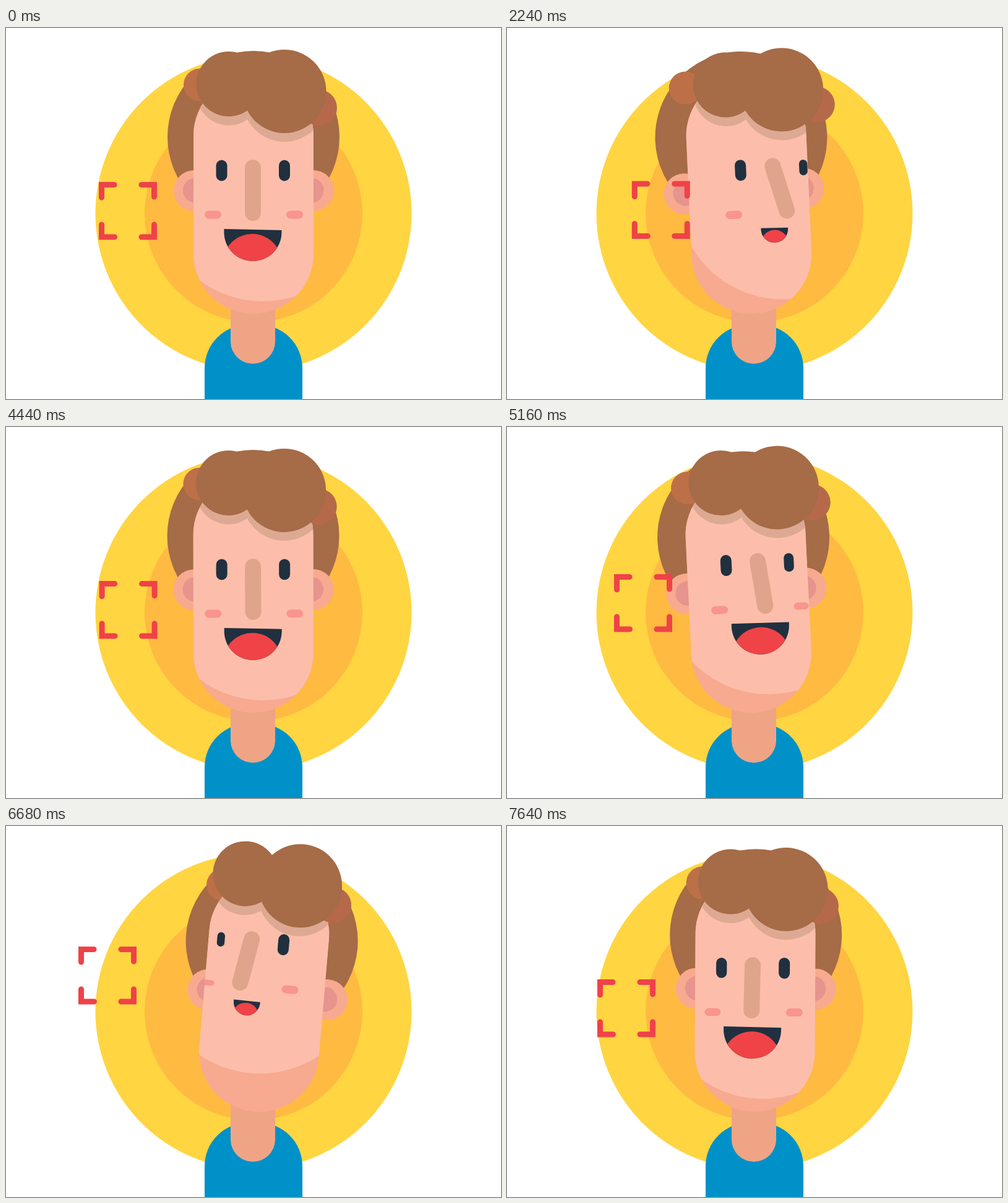
Recreate the animation shown at these times as an HTML page. Size 800 px wide and 600 px high, loop 7680 ms.

```html
<!DOCTYPE html>
<html lang="en">
<head>
<meta charset="utf-8">
<title>Talking head</title>
<style>
html, body { margin: 0; width: 100%; height: 100%; overflow: hidden; background: #fff; }
svg { display: block; width: 100%; height: 100%; }
</style>
</head>
<body>
<svg viewBox="0 0 800 600">
  <defs>
    <clipPath id="face"><rect x="303" y="77" width="194" height="385" rx="97"/></clipPath>
    <clipPath id="lips"><path id="lip" d="M-46.5 0H46.5V4.5A46.5 46.5 0 0 1-46.5 4.5Z"/></clipPath>
  </defs>
  <circle cx="400" cy="300" r="255.5" fill="#ffd541"/>
  <circle cx="400" cy="300" r="176" fill="#ffba42"/>
  <path d="M321 600V550A70 70 0 0 1 391 480H409A70 70 0 0 1 479 550V600Z" fill="#0091c9"/>
  <path d="M363 400H435V507A36 36 0 0 1 363 507Z" fill="#efa486"/>

  <g id="head">
    <g data-k="-.16">
      <circle cx="400" cy="176" r="139" fill="#a66b47"/>
      <g fill="#f7aa8f"><circle cx="304" cy="263" r="33"/><circle cx="497" cy="263" r="33"/></g>
      <g fill="#e6948d"><circle cx="306" cy="262.5" r="20"/><circle cx="493.5" cy="262.5" r="20"/></g>
      <circle cx="313.5" cy="92" r="26.5" fill="#bd7048"/>
    </g>
    <g clip-path="url(#face)">
      <rect x="303" y="77" width="194" height="385" fill="#f7aa8f"/>
      <g data-k=".77">
        <path transform="translate(415 276)" d="M-169-300V0A169 166 0 0 0 169 0V-300Z" fill="#fcbeaa"/>
        <g fill="#f9958c">
          <g id="blushL"><rect x="-13.5" y="-6.5" width="27" height="13" rx="6.5"/></g>
          <g id="blushR"><rect x="-13.5" y="-6.5" width="27" height="13" rx="6.5"/></g>
        </g>
      </g>
      <g data-k=".2" fill="#dda992">
        <circle cx="360" cy="105" r="52.5"/>
        <circle cx="450" cy="116.5" r="67.5"/>
      </g>
    </g>
    <g data-k=".77" fill="#20303f">
      <g id="eyeL"><rect x="-9" y="-17" width="18" height="34" rx="9"/></g>
      <g id="eyeR"><rect x="-9" y="-17" width="18" height="34" rx="9"/></g>
    </g>
    <line id="nose" stroke="#dfa48b" stroke-width="26" stroke-linecap="round"/>
    <g data-k=".77">
      <g id="mouth">
        <use href="#lip" fill="#20303f"/>
        <circle cy="54.5" r="47.5" fill="#f04347" clip-path="url(#lips)"/>
      </g>
    </g>
    <g data-k=".2">
      <circle cx="506" cy="129" r="29" fill="#b5694a"/>
      <g fill="#a66b47"><circle cx="360" cy="90.5" r="52.5"/><circle cx="450" cy="102.5" r="67.5"/></g>
    </g>
  </g>

  <g id="frame" fill="none" stroke="#ef4248" stroke-width="9" stroke-linecap="round">
    <path d="M154.500 274V253.500H175M219 253.500H239.500V273M154.500 318V338H175.500M219 338H239.500V318"/>
  </g>
</svg>
<script>
const LOOP = 7680, STEP = 40;
const $ = id => document.getElementById(id);
const layers = [...document.querySelectorAll('[data-k]')];
const put = (el, value) => el.setAttribute('transform', value);

// Shared key times of the three quick turns, then a slow sweep around.
const turns = [0, 800, 1200, 2200, 2600, 3480, 3880, 4360];
const sweep = [4760, 5160, 5600, 6040, 6360, 6680, 7000, 7320, 7560, 7640, 7680];
const path = turns.concat(sweep);
const lean = turns.concat(5160, 6040, 6680, 7560, 7640, 7680);
const talk = turns.concat(5400, 5900, 6800, 7300, 7680);

// Smooth curve through the keys: flat at peaks and holds.
function curve(times, values) {
  const n = times.length - 1;
  const rate = i => (values[i + 1] - values[i]) / (times[i + 1] - times[i]);
  const slope = times.map((_, i) => {
    if (i === 0) return rate(0);
    if (i === n) return rate(n - 1);
    const a = rate(i - 1), b = rate(i);
    return a * b > 0 ? 2 * a * b / (a + b) : 0;
  });
  return t => {
    let i = 0;
    while (i < n - 1 && t >= times[i + 1]) i++;
    const d = times[i + 1] - times[i], u = (t - times[i]) / d, v = 1 - u;
    return values[i] * v * v * (1 + 2 * u) + values[i + 1] * u * u * (3 - 2 * u)
      + d * u * v * (slope[i] * v - slope[i + 1] * u);
  };
}

const lookX = curve(path, [0, 0, 54.3, 54.3, -37.1, -37.1, 0, 0,
  9, 23, 27, 13, -10, -33, -38, -26, -9, -4, 0]);
const lookY = curve(path, [0, 0, 0, 0, -52.6, -52.6, 0, 0,
  -2, -11, -34, -56, -64, -54, -30, -9, -2, -1, 0]);
const tilt = curve(lean, [0, 0, -2.8, -2.8, 4.55, 4.55, 0, 0,
  -2.8, -3.1, 4.9, .9, .3, 0]);
const open = curve(talk, [1, 1, .455, .455, 1, 1, 1, 1, 1, .46, .46, 1, 1]);

function draw(t) {
  const x = lookX(t), y = lookY(t);
  put($('head'), `rotate(${tilt(t)} 400 470)`);
  put($('frame'), `translate(${x} ${y})`);
  for (const el of layers) put(el, `translate(${x * el.dataset.k} ${y * el.dataset.k})`);

  // The far side of the face shrinks as it turns away.
  const left = 1 + .0095 * Math.min(x, 0), right = 1 - .005 * Math.max(x, 0);
  put($('eyeL'), `translate(348.500 230.500) scale(${left})`);
  put($('eyeR'), `translate(450 230.500) scale(${right})`);
  put($('blushL'), `translate(334.500 302) scale(${left})`);
  put($('blushR'), `translate(466.500 302) scale(${right})`);
  put($('mouth'), `translate(399 326) rotate(1.1) scale(${open(t)})`);

  const nose = { x1: 399 + .8 * x, y1: 226 + .77 * y, x2: 399 + 1.18 * x, y2: 299 + .8 * y };
  for (const k in nose) $('nose').setAttribute(k, nose[k]);
}

const start = performance.now();
function tick() {
  const t = (performance.now() - start) % LOOP;
  draw(Math.floor(t / STEP) * STEP);
  requestAnimationFrame(tick);
}
tick();
</script>
</body>
</html>
```
